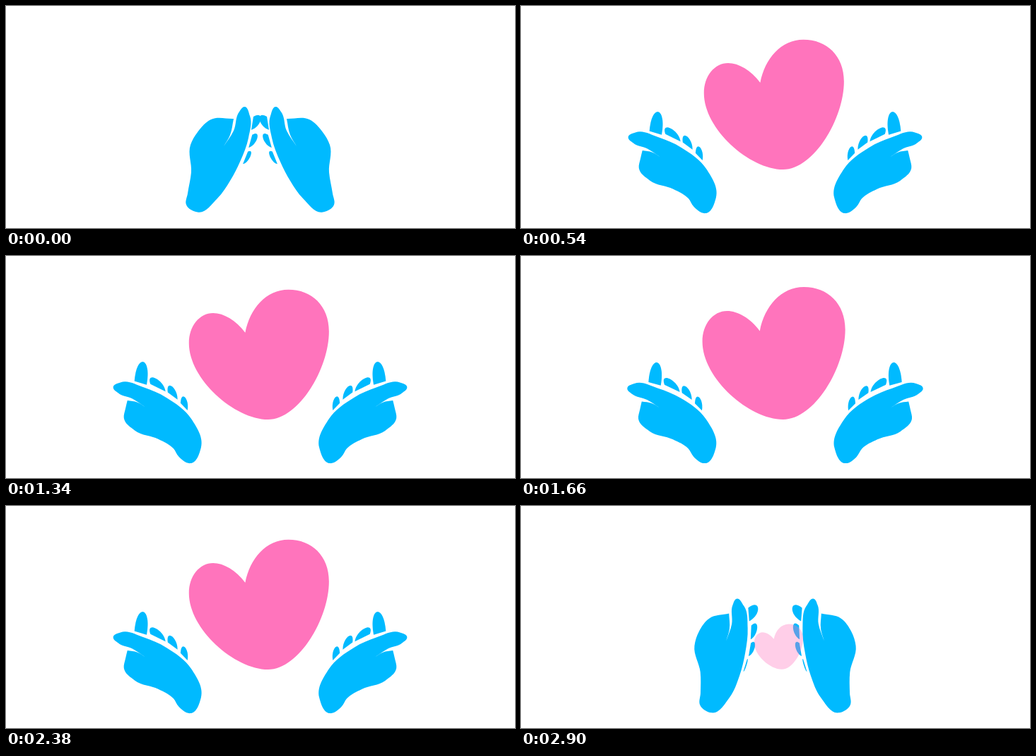
These frames come from a looping animation (720 px wide and 315 px high, 2960 ms). An HTML page with a canvas:

```html
<!DOCTYPE html>
<html lang="en">
<head>
<meta charset="utf-8">
<title>Hands and heart</title>
<style>
html, body { margin: 0; width: 100%; height: 100%; overflow: hidden; background: #fff; }
canvas { display: block; }
</style>
</head>
<body>
<canvas id="stage" width="720" height="315"></canvas>
<script>
const ctx = document.getElementById('stage').getContext('2d');
const BLUE = '#00baff', PINK = '#ff74bc';
const LOOP = 2960, STEPS = 39;
const WRIST = { x: 265, y: 280 };

// Key points of the hand: x, y closed, then x, y open. The two runs meet in sharp corners.
const HAND = [
  [337, 143, 146.5, 193], [345, 156, 156, 186], [343, 187, 190, 191], [331, 221, 222, 203],
  [317, 248, 260, 232], [299, 273, 275, 272], [271, 292.5, 260, 294], [255, 282, 244, 285],
  [257, 266, 236, 274], [262, 236, 214, 262], [261, 197, 181, 252], [271, 179, 164, 235],
  [290, 161, 166, 222], [322, 160, 168, 211]
];
const GAP = [[322, 160, 168, 211], [317, 183, 182, 212.5], [308, 199, 193, 218]];
const THUMB = [[308, 199, 193, 218], [322, 177, 175, 208], [330, 150, 154, 201]];

const mix = (a, b, k) => a + (b - a) * k;
const rad = deg => deg * Math.PI / 180;
const onArc = (a, r) => ({ x: WRIST.x + r * Math.cos(a), y: WRIST.y + r * Math.sin(a) });

// Swing a key point around the wrist, by the shorter way.
function swing([x0, y0, x1, y1], k) {
  const polar = (x, y) => [Math.atan2(y - WRIST.y, x - WRIST.x), Math.hypot(x - WRIST.x, y - WRIST.y)];
  const [a0, r0] = polar(x0, y0), [a1, r1] = polar(x1, y1);
  const turn = a1 - a0 - 2 * Math.PI * Math.round((a1 - a0) / (2 * Math.PI));
  return onArc(a0 + turn * k, mix(r0, r1, k));
}

// Smooth curve through points; each tangent is that of the circle through the neighbours.
function smooth(pts) {
  const segs = pts.slice(1).map((p, i) => {
    const x = p.x - pts[i].x, y = p.y - pts[i].y, len = Math.hypot(x, y);
    return { x: x / len, y: y / len, len };
  });
  const tangents = pts.map((p, i) => {
    const a = segs[i - 1] || segs[i], b = segs[i] || a;
    const x = a.x * b.len + b.x * a.len, y = a.y * b.len + b.y * a.len, len = Math.hypot(x, y);
    return { x: x / len, y: y / len };
  });
  segs.forEach((s, i) => {
    const p = pts[i], q = pts[i + 1], t = tangents[i], u = tangents[i + 1], h = s.len * 0.34;
    ctx.bezierCurveTo(p.x + t.x * h, p.y + t.y * h, q.x - u.x * h, q.y - u.y * h, q.x, q.y);
  });
}

function drawPalm(k) {
  const pose = run => run.map(p => swing(p, k));
  const gap = pose(GAP);
  ctx.beginPath();
  ctx.moveTo(gap[0].x, gap[0].y);
  smooth(gap);
  smooth(pose([...THUMB, ...HAND]));
  ctx.fill();
}

// Fingers are spread evenly around the palm, each a rounded bump leaning off its base.
function drawFinger(i, k) {
  const base = onArc(rad(mix(36.3 + 6.2 * i, -40 + 8.6 * i, k) - 90), mix(141 - 21.5 * i, 124 - 19 * i, k));
  const tilt = mix(99 + 6.5 * i, 13 + 10 * i, k);
  const dir = rad(tilt - (i ? 40 : mix(33, 8, k)));
  const long = mix(13 * Math.sqrt(1 - i / 3), i ? 14 : 31, k) * 4 / 3;
  const wide = mix(19, [18, 24, 17, 14][i], k) / 2;
  const wx = wide * Math.cos(rad(tilt)), wy = wide * Math.sin(rad(tilt));
  const tx = base.x + long * Math.sin(dir), ty = base.y - long * Math.cos(dir);
  const bulge = 1.25;
  ctx.beginPath();
  ctx.moveTo(base.x - wx, base.y - wy);
  ctx.bezierCurveTo(tx - wx * bulge, ty - wy * bulge, tx + wx * bulge, ty + wy * bulge,
    base.x + wx, base.y + wy);
  ctx.fill();
}

function drawHands(k) {
  ctx.fillStyle = BLUE;
  for (const side of [1, -1]) {
    ctx.save();
    if (side < 0) ctx.transform(-1, 0, 0, 1, 719, 0);
    drawPalm(k);
    for (let i = 0; i < 4; i++) drawFinger(i, k);
    ctx.restore();
  }
}

function drawHeart(size, alpha) {
  ctx.save();
  ctx.globalAlpha = alpha;
  ctx.translate(368, 231.7);
  ctx.scale(size, size);
  ctx.translate(-368, -231.7);
  ctx.beginPath();
  ctx.moveTo(336, 99);
  ctx.bezierCurveTo(322, 80, 303, 69, 287, 69);
  ctx.bezierCurveTo(266, 69, 250, 89, 250, 115);
  ctx.bezierCurveTo(250, 170, 320, 232, 371, 232);
  ctx.bezierCurveTo(418, 232, 464, 154, 464, 97);
  ctx.bezierCurveTo(464, 58, 438, 33, 402, 33);
  ctx.bezierCurveTo(368, 33, 343, 62, 336, 99);
  ctx.fillStyle = PINK;
  ctx.fill();
  ctx.restore();
}

// The opening and the closing run in 60 ms steps, the rest in 80 ms steps.
function stepAt(t) {
  if (t < 300) return Math.floor(t / 60);
  if (t < 2780) return 5 + Math.floor((t - 300) / 80);
  return 36 + Math.floor((t - 2780) / 60);
}

function draw(t) {
  const step = stepAt(t);
  const p = Math.min(step, STEPS - step); // there and back
  const q = Math.min(1, p / 4);
  const beat = p < 4 ? 0 : 5 - Math.abs((p - 4) % 10 - 5);
  ctx.fillStyle = '#fff';
  ctx.fillRect(0, 0, 720, 315);
  drawHands(q * q * (3 - 2 * q) - 0.0105 * beat);
  drawHeart(0.17 + 0.54 * q + 0.29 * q * q - 0.0186 * beat, Math.min(1, p * 0.35));
}

const start = performance.now();
function tick() {
  draw((performance.now() - start) % LOOP);
  requestAnimationFrame(tick);
}
tick();
</script>
</body>
</html>
```
